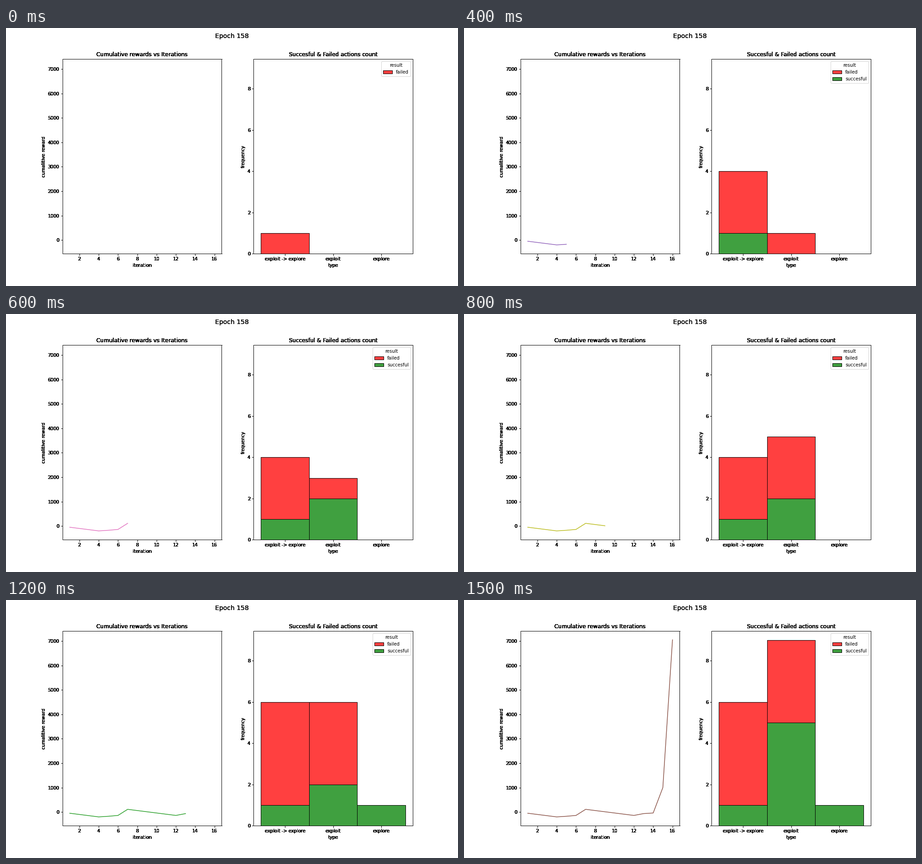
A matplotlib script that plays this animation: 990 by 566 pixels, repeating every 1.6 s.

```python
import matplotlib.pyplot as plt
import numpy as np
from matplotlib.animation import FuncAnimation
from matplotlib.patches import Patch

DPI = 72
FRAMES = 16
COPIES = 10  # text and frames are painted over themselves, which hardens their edges

KINDS = ["exploit -> explore", "exploit", "explore"]
COLORS = {"failed": (1, 0, 0, 0.75), "succesful": (0, 0.5, 0, 0.75)}

REWARDS = [-50, -50, -50, -50, 25, 35, 250, -50, -50, -50, -50, -50, 75, 25, 1040, 6055]
ACTIONS = [0, 0, 1, 0, 0, 1, 1, 1, 1, 0, 1, 0, 2, 1, 1, 1]

steps = np.arange(1, FRAMES + 1)
total = np.cumsum(REWARDS)
margin = 0.05 * (total.max() - total.min())

plt.rcParams["font.family"] = "DejaVu Sans"
fig = plt.figure(figsize=(990 / DPI, 566 / DPI), dpi=DPI, facecolor="white")
grid = fig.add_gridspec(1, 2, left=0.125, right=0.9, bottom=0.125, top=0.88, wspace=0.2)


def setup_reward(ax):
    ax.set(xlim=(0.25, 16.75), ylim=(total.min() - margin, total.max() + margin),
           xticks=range(2, 17, 2), yticks=range(0, 7001, 1000))


def setup_count(ax):
    ax.set(xlim=(-0.65, 2.65), ylim=(0, 9.45), yticks=range(0, 9, 2))
    ax.set_xticks(range(3), KINDS)


def add_panel(cell, setup, title, xlabel, ylabel):
    """Data axes without decoration, below a stack of identical frames."""
    base = fig.add_subplot(cell)
    setup(base)
    base.axis("off")
    for _ in range(COPIES):
        ax = fig.add_subplot(cell, facecolor="none")
        setup(ax)
        ax.set_title(title)
        ax.set_xlabel(xlabel)
        ax.set_ylabel(ylabel)
    return base


reward_ax = add_panel(grid[0], setup_reward, "Cumulative rewards vs Iterations",
                      "iteration", "cumalitive reward")
count_ax = add_panel(grid[1], setup_count, "Succesful & Failed actions count",
                     "type", "frequency")
for _ in range(3):
    fig.text(0.5, 0.98, "Epoch 158", size=14, ha="center", va="top")

line, = reward_ax.plot([], [], lw=1.5)
bar_style = dict(width=1, edgecolor="black", linewidth=1)
bars = {name: count_ax.bar(range(3), [0] * 3, color=color, **bar_style)
        for name, color in COLORS.items()}


def count(n, success):
    hits = [a for a, r in zip(ACTIONS[:n], REWARDS[:n]) if (r > 0) == success]
    return np.bincount(hits, minlength=3) if hits else np.zeros(3)


def draw(i):
    n = i + 1
    line.set_data(steps[:n], total[:n])
    line.set_color(f"C{i % 10}")

    good, bad = count(n, True), count(n, False)
    for name, heights, bottoms in (("failed", bad, good), ("succesful", good, np.zeros(3))):
        for bar, height, bottom in zip(bars[name], heights, bottoms):
            bar.set_height(height)
            bar.set_y(bottom)
            bar.set_visible(height > 0)

    names = [name for name in COLORS if name == "failed" or good.any()]
    handles = [Patch(facecolor=COLORS[name], edgecolor="black", linewidth=1, label=name)
               for name in names]
    count_ax.legend(handles=handles, title="result", loc="upper right")
    return []


anim = FuncAnimation(fig, draw, frames=FRAMES, interval=100, repeat=True,
                     repeat_delay=0, blit=False)
plt.show()
```
